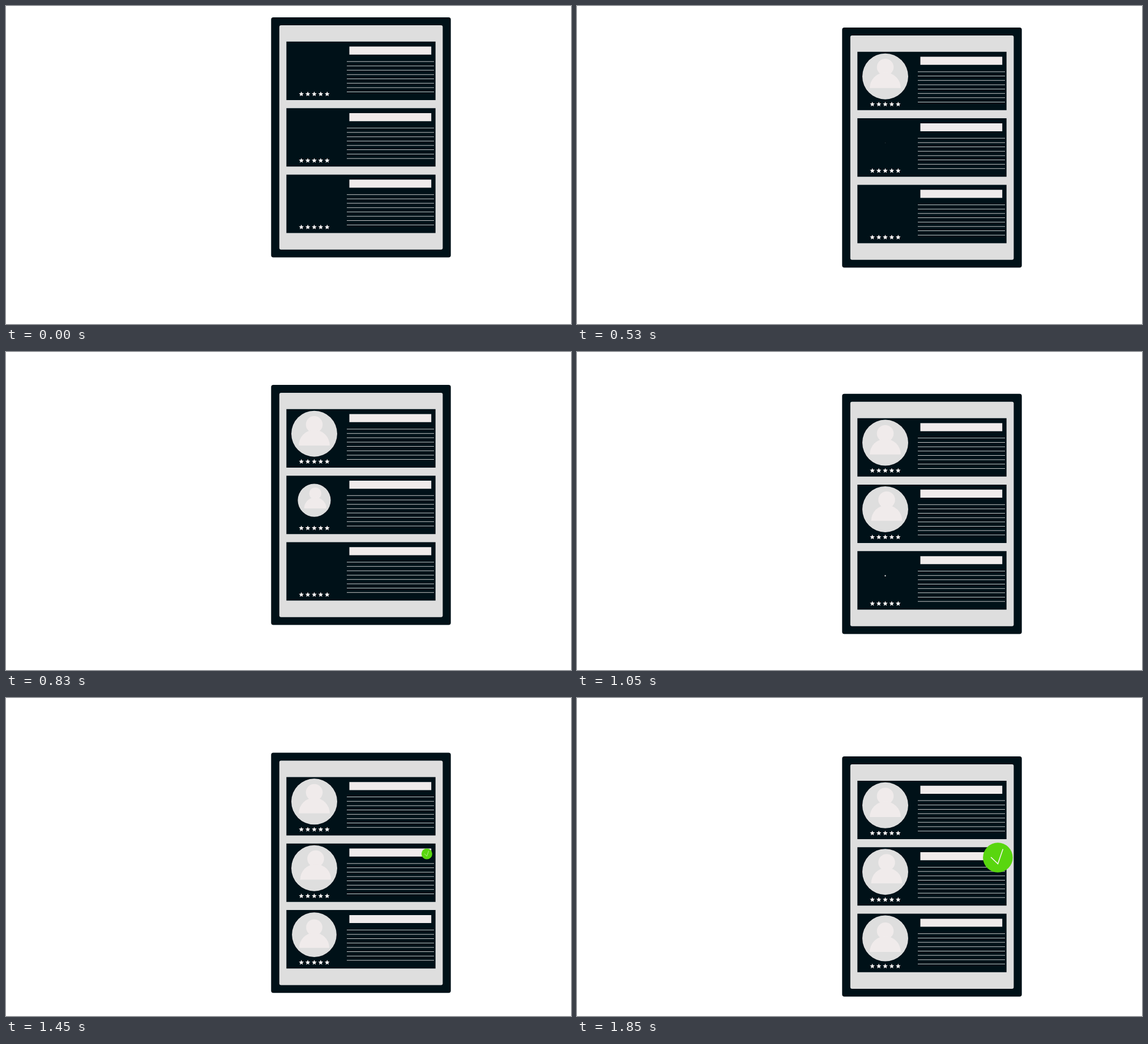
An HTML page with a canvas that plays this animation: 998 by 561 pixels, repeating every 2.03 s.

```html
<!DOCTYPE html>
<html lang="en">
<head>
<meta charset="utf-8">
<title>Review list</title>
<style>
html, body { margin: 0; width: 100%; height: 100%; overflow: hidden; background: #fff; }
canvas { display: block; }
</style>
</head>
<body>
<canvas id="stage" width="998" height="561"></canvas>
<script>
const ctx = document.getElementById('stage').getContext('2d');
const DARK = '#001118', GREY = '#dedede', PALE = '#f0ebeb', GREEN = '#59d60f';
const LOOP = 2030, STEP = 25, ROW_GAP = 117.35;
// Small shifts of the figure inside each avatar
const FIGURE = [[0, 0], [2.5, -0.4], [0, 3.2]];

function ease(t, start, length) {
  const s = Math.min(1, Math.max(0, (t - start) / length));
  return s * s * (3 - 2 * s);
}

function box(x, y, w, h, color, r = 0) {
  ctx.fillStyle = color;
  ctx.beginPath();
  ctx.roundRect(x, y, w, h, r);
  ctx.fill();
}

function disc(x, y, r, color, from = 0, to = 2 * Math.PI) {
  ctx.fillStyle = color;
  ctx.beginPath();
  ctx.arc(x, y, r, from, to);
  ctx.fill();
}

function star(x, y) {
  ctx.fillStyle = '#f7f3f3';
  ctx.beginPath();
  for (let i = 0; i < 10; i++) {
    const r = i % 2 ? 2.1 : 4.6, a = (i / 5 - 0.5) * Math.PI;
    ctx.lineTo(x + r * Math.cos(a), y + r * Math.sin(a));
  }
  ctx.fill();
}

// Draws a part around its own centre at the given scale
function scaled(x, y, k, draw) {
  if (!k) return;
  ctx.save();
  ctx.translate(x, y);
  ctx.scale(k, k);
  draw();
  ctx.restore();
}

function row(i, t) {
  const y = i * ROW_GAP;
  box(495.3, 62.8 + y, 263.4, 103.1, DARK);
  box(606.5, 71.6 + y, 144.7, 14.2, PALE);
  for (let n = 0; n < 8; n++) box(602, 97.5 + y + n * 7.65, 154, 1, '#c9c9c9');
  for (let n = 0; n < 5; n++) star(521.7 + n * 11.4, 155.4 + y);
  scaled(544.5, 106.2 + y, ease(t, i * 500, 500), () => {
    const [dx, dy] = FIGURE[i];
    disc(0, 0, 40.5, GREY);
    disc(dx, dy - 16.3, 14.8, PALE);
    disc(dx, dy + 20.7, 27.4, PALE, Math.PI);
  });
}

function badge() {
  disc(0, 0, 26.3, GREEN);
  ctx.strokeStyle = '#f4f4ee';
  ctx.lineWidth = 1.6;
  ctx.beginPath();
  ctx.moveTo(-12.3, -0.7);
  ctx.lineTo(0, 11);
  ctx.lineTo(9, -15);
  ctx.stroke();
}

function frame() {
  const t = Math.floor((performance.now() % LOOP + 0.5) / STEP) * STEP;
  ctx.clearRect(0, 0, 998, 561);
  ctx.save();
  ctx.translate(0, 83.1 * ease(t, 0, 1750));
  box(468.3, 20, 317.4, 423.6, DARK, 4);
  box(482.8, 34, 288.6, 395.8, GREY, 3);
  for (let i = 0; i < 3; i++) row(i, t);
  scaled(743.4, 198.4, ease(t, 1175, 675), badge);
  ctx.restore();
  requestAnimationFrame(frame);
}
frame();
</script>
</body>
</html>
```
